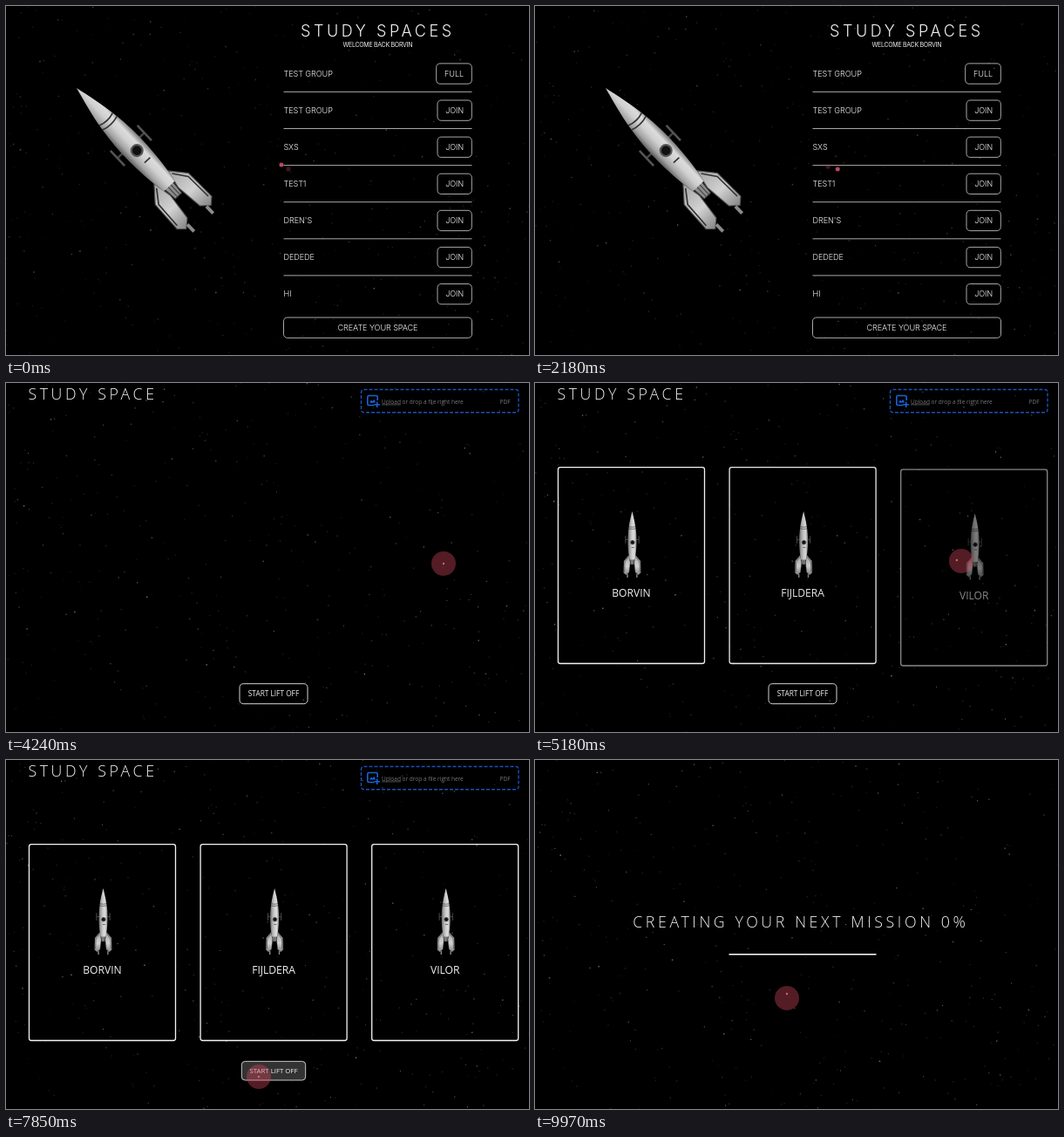
Animation of 600x400 px, one loop 10000 ms. Source, as an HTML page with a canvas:

```html
<!DOCTYPE html>
<html lang="en">
<head>
<meta charset="utf-8">
<title>Study spaces</title>
<style>
  html, body { margin: 0; width: 100%; height: 100%; overflow: hidden; background: #000; }
  canvas, svg { position: absolute; left: 0; top: 0; display: block; }
  text { fill: #f2f2f2; white-space: pre; }
  .list text { font: 300 9.1px Inter, sans-serif; letter-spacing: -.08px; }
  .list .title { font-size: 18px; letter-spacing: 3.6px; }
  .list .hello { font-size: 7px; font-weight: 400; letter-spacing: -.28px; }
  .room text { font: 400 12.1px "Open Sans", "Noto Sans", sans-serif; }
  .room .title { font-size: 17.8px; font-weight: 300; letter-spacing: 3.6px; }
  .room .action { font-size: 8.3px; }
  .room .hint { font-size: 6.5px; fill: #777; }
  .mid { text-anchor: middle; }
  .btn { fill: #000; fill-opacity: 0; stroke: #d4d4d4; stroke-width: 1; }
  .list .btn { stroke: #a8a8a8; }
  .rule { stroke: #a8a8a8; stroke-width: 1; }
  .card { fill: none; stroke: #f4f4f4; stroke-width: 1.3; }
</style>
</head>
<body>
<canvas id="sky" width="600" height="400"></canvas>
<svg id="stage" width="600" height="400" viewBox="0 0 600 400">
  <defs>
    <linearGradient id="hull">
      <stop offset="0" stop-color="#5c5c5c"/>
      <stop offset=".22" stop-color="#a4a4a4"/>
      <stop offset=".5" stop-color="#d0d0d0"/>
      <stop offset=".75" stop-color="#dcdcdc"/>
      <stop offset="1" stop-color="#777"/>
    </linearGradient>
    <linearGradient id="fin" x2="0" y2="1">
      <stop offset="0" stop-color="#a4a4a4"/>
      <stop offset=".55" stop-color="#d2d2d2"/>
      <stop offset="1" stop-color="#858585"/>
    </linearGradient>
    <g id="half">
      <path d="M3.9 50.5L9.4 57 9.8 70.5 7 73 3.6 70 2.3 58.5Z" fill="url(#fin)" stroke="#555" stroke-width=".4"/>
      <path d="M4.4 52.5L8.4 58 8.8 69.5" fill="none" stroke="#333" stroke-width=".6"/>
      <path d="M5.4 72V76" stroke="#8a8a8a" stroke-width="1.4"/>
      <path d="M4.6 32.5H7.6" stroke="#444" stroke-width=".9"/>
      <path d="M7.6 28.3V36.8" stroke="#555" stroke-width=".9"/>
    </g>
    <g id="rocket">
      <use href="#half"/>
      <use href="#half" transform="scale(-1 1)"/>
      <path d="M-2.4 54H2.4L1.8 61H-1.8Z" fill="#8c8c8c" stroke="#333" stroke-width=".4"/>
      <path d="M-.6 55V61M.8 55V61" stroke="#444" stroke-width=".4"/>
      <path d="M0 0C1.2 5 3.2 13 3.9 18.5C4.8 25 5.2 31 5 37C4.7 45 4 51 3 55.5H-3C-4 51 -4.7 45 -5 37C-5.2 31 -4.8 25 -3.9 18.5C-3.2 13 -1.2 5 0 0Z" fill="url(#hull)"/>
      <path d="M-3.8 17.6Q0 19 3.8 17.6M-4.1 19.8Q0 21.2 4.1 19.8" fill="none" stroke="#333" stroke-width=".6"/>
      <path d="M-.8 41.5H2.4" stroke="#333" stroke-width=".6"/>
      <circle cx=".4" cy="35.7" r="2.3" fill="#111" stroke="#555" stroke-width=".8"/>
    </g>
  </defs>
</svg>
<script>
const LOOP = 10000, ROOM_AT = 3700, LOAD_AT = 8300, LAG = 100;
const stage = document.getElementById('stage');
const sky = document.getElementById('sky').getContext('2d');
const clamp = v => Math.max(0, Math.min(1, v));

const label = (x, y, s, cls = '') => `<text x="${x}" y="${y}" class="${cls}">${s}</text>`;
const button = (id, x, y, w, h, s, cls = '') => `<g id="${id}">
  <rect class="btn" x="${x}" y="${y}" width="${w}" height="${h}" rx="4.2"/>
  ${label(x + w / 2, y + h / 2 + 3.2, s, 'mid ' + cls)}</g>`;

const groups = ['TEST GROUP', 'TEST GROUP', 'SXS', 'TEST1', "DREN'S", 'DEDEDE', 'HI'];
const crew = ['BORVIN', 'FIJLDERA', 'VILOR'];

const rows = groups.map((name, i) => {
  const y = 77.5 + i * 42.1;
  const x = i ? 495 : 493.7;
  return label(318.5, y + 3.3, name)
    + button('join' + i, x, y - 11.6, 534.3 - x, 23.3, i ? 'JOIN' : 'FULL')
    + (i < 6 ? `<path class="rule" d="M318.5 ${y + 20.9}H534.5"/>` : '');
}).join('');

const cards = crew.map((name, i) => {
  const x = 26.5 + i * 196.6;
  return `<g id="card${i}">
    <rect class="card" x="${x}" y="96.7" width="168" height="224.8" rx="2.5"/>
    <use href="#rocket" transform="translate(${x + 85} 147)"/>
    ${label(x + 84, 245.3, name, 'mid')}</g>`;
}).join('');

stage.insertAdjacentHTML('beforeend', `
  <g id="list" class="list">
    <use href="#rocket" transform="translate(81 94) rotate(-43.4) scale(2.79)"/>
    ${label(338, 35, 'STUDY SPACES', 'title')}
    ${label(426.3, 46.6, 'WELCOME BACK BORVIN', 'hello mid')}
    ${rows}
    ${button('create', 318.5, 357, 216, 23.4, 'CREATE YOUR SPACE')}
  </g>
  <g id="room" class="room">
    ${label(25.4, 19, 'STUDY SPACE', 'title')}
    <rect x="407.5" y="7.5" width="180.5" height="26.3" rx="3" fill="none"
      stroke="#1c50b8" stroke-width="1.4" stroke-dasharray="4 2"/>
    <g fill="none" stroke="#1763d8" stroke-width="1.6">
      <path d="M422.5 25.5H416.5Q414.8 25.5 414.8 23.8V16.2Q414.8 14.5 416.5 14.5H424.5Q426.2 14.5 426.2 16.2V20"/>
      <path d="M425.7 21.5V28M422.5 24.8H429"/>
      <path d="M417 22.5L419 19.5 420.5 21 422.3 18.8 424 22.5Z" fill="#1763d8" stroke="none"/>
    </g>
    ${label(431, 23.6, '<tspan text-decoration="underline">Upload</tspan> or drop a file right here', 'hint')}
    ${label(566.5, 23.6, 'PDF', 'hint')}
    ${cards}
    ${button('lift', 268, 344.7, 78, 23, 'START LIFT OFF', 'action')}
  </g>
  <g id="load" class="room">
    ${label(112.2, 192.3, 'CREATING YOUR NEXT MISSION 0%', 'title')}
    <path d="M222.5 222.7H391.5" stroke="#fff" stroke-width="1.5"/>
  </g>
  <circle id="halo" fill="#d2465c"/>
  <circle id="dot"/>`);

const el = id => document.getElementById(id);

// Pointer path: time, x, y
const path = [
  [-100, 324, 187], [0, 316, 182], [300, 300, 177], [1200, 300, 177], [1900, 318, 181],
  [2080, 336, 184], [2180, 347, 187], [2900, 498, 206], [3200, 502, 207], [4950, 502, 207],
  [5080, 489, 204], [5180, 484, 203], [5900, 410, 212], [6400, 344, 250], [6690, 304, 306],
  [6790, 286, 340], [6960, 289, 361], [7200, 290, 363], [9000, 290, 363], [9400, 289, 322],
  [9870, 289, 273], [9970, 289, 268], [10000, 289, 267]
];

function pointer(t) {
  let i = 1;
  while (i < path.length - 1 && path[i][0] < t) i++;
  const [t0, x0, y0] = path[i - 1], [t1, x1, y1] = path[i];
  const p = clamp((t - t0) / (t1 - t0));
  return [x0 + (x1 - x0) * p, y0 + (y1 - y0) * p];
}

let seed = 41;
const rand = () => (seed = seed * 16807 % 2147483647) / 2147483647;
const stars = Array.from({ length: 720 }, () => ({
  r: 365 * Math.sqrt(rand()), a: rand() * Math.PI * 2,
  size: .8 + rand() * .7, glow: .12 + .4 * rand() ** 2.5
}));

function drawSky(t) {
  sky.clearRect(0, 0, 600, 400);
  const dim = t < ROOM_AT ? .8 : 1;
  for (const s of stars) {
    const a = s.a + t * .00002;
    sky.fillStyle = `rgba(225,225,225,${s.glow * dim})`;
    sky.fillRect(300 + s.r * Math.cos(a), 200 + s.r * Math.sin(a), s.size, s.size);
  }
}

function hover(id, cx, cy, p) {
  const k = 1 - .06 * p;
  el(id).setAttribute('transform', `translate(${cx} ${cy}) scale(${k}) translate(${-cx} ${-cy})`);
  const box = el(id).firstElementChild;
  box.style.fill = '#333';
  box.style.fillOpacity = p;
}

function place(id, [x, y], r, opacity) {
  const c = el(id);
  c.setAttribute('cx', x);
  c.setAttribute('cy', y);
  c.setAttribute('r', r);
  c.setAttribute('opacity', opacity);
}

function draw(t) {
  const scene = t < ROOM_AT ? 'list' : t < LOAD_AT ? 'room' : 'load';
  for (const id of ['list', 'room', 'load']) el(id).style.display = id === scene ? '' : 'none';
  drawSky(t);

  crew.forEach((_, i) => {
    const p = clamp((t - 4500 - i * 200) / 500);
    const card = el('card' + i);
    card.setAttribute('opacity', p);
    card.setAttribute('transform', `translate(0 ${30 * (1 - p) ** 3})`);
  });
  hover('join3', 514.7, 203.8, clamp((t - 2890) / 200));
  hover('lift', 307, 356.2, clamp((t - 6820) / 200));

  const grow = clamp((t - 2850) / 250);
  place('halo', pointer(t - LAG), 2.6 + 11.4 * grow, .3 + .1 * grow);
  place('dot', pointer(t), 2.5 - 1.3 * grow, .9);
  el('dot').setAttribute('fill', grow < 1 ? '#d24f6c' : '#dc7080');
}

const start = performance.now();
function tick() {
  draw((performance.now() - start) % LOOP);
  requestAnimationFrame(tick);
}
tick();
</script>
</body>
</html>
```
